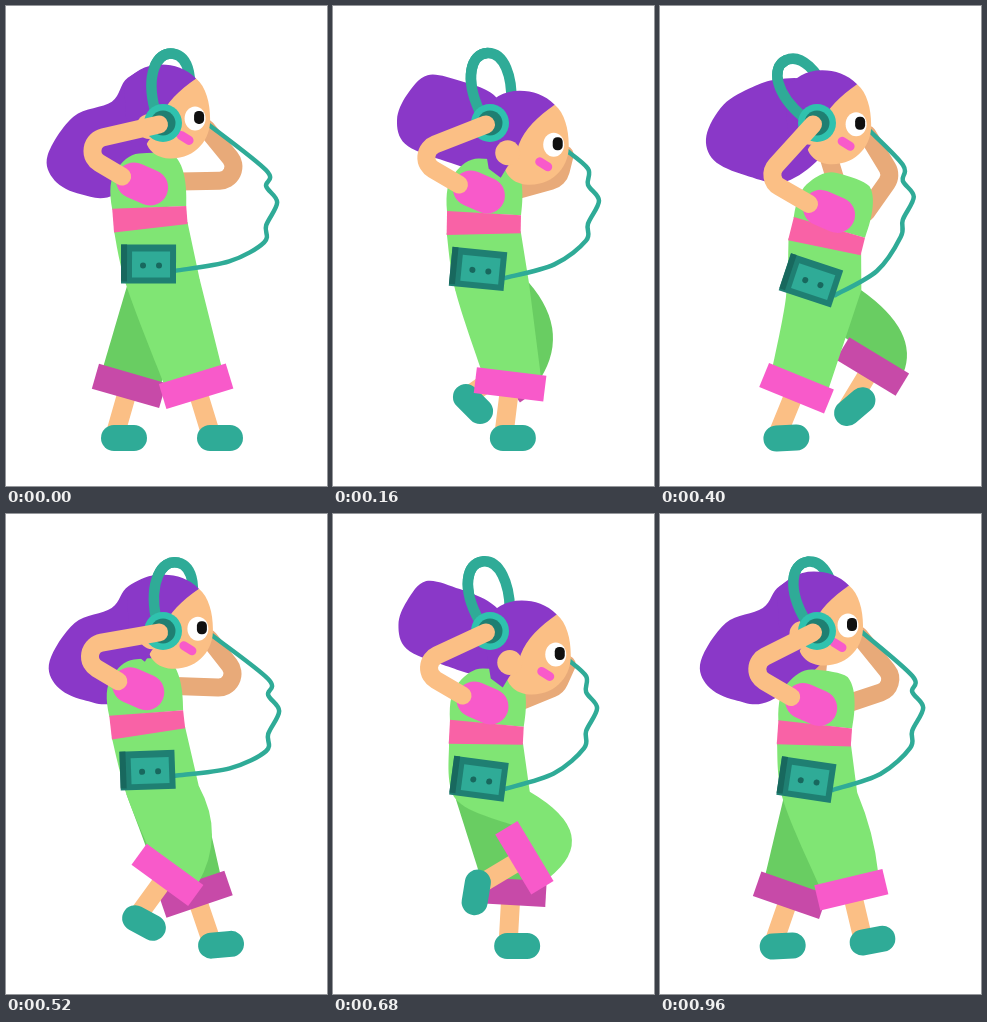
Write an HTML page with a canvas that moves like this. It is 321 px wide and 480 px high and loops after 1 s.

```html
<!DOCTYPE html>
<html lang="en">
<head>
<meta charset="utf-8">
<title>Dancing with headphones</title>
<style>
html, body { margin: 0; height: 100%; overflow: hidden; background: #fff; }
canvas { display: block; }
</style>
</head>
<body>
<canvas id="stage" width="321" height="480"></canvas>
<script>
const ctx = document.getElementById("stage").getContext("2d");
const SKIN = "#fbbf85", SKIN_DARK = "#e8aa79", HAIR = "#8a38c8", TEAL = "#2fab97",
  CUP = "#2fc2ae", TEAL_DARK = "#1f7f72", TEAL_DEEP = "#18685e", GREEN = "#80e574",
  GREEN_DARK = "#69cd62", PINK = "#f85aca", PINK_DARK = "#c74aa8", BELT = "#f962a6";
const FLOOR = 432, FAR_LEG = 460, SHIN = 51;

// Upper body, two beats per loop: time, lean in degrees, nod, hair lift
const BEAT = [
  [20, -6.5, 0.03, 0], [170, 2, 1.03, 1], [280, 18, 0.93, 1.1],
  [340, 21.5, 0.53, 1], [460, 4, -0.1, 0]];
// One leg, one stride per loop: time, foot x, y and angle, shin angle
const STRIDE = [
  [0, 214, FLOOR, 0, -17], [150, 182, FLOOR, 0, 5], [290, 152, FLOOR, 0, 36],
  [460, 118, FLOOR, 0, 16], [520, 138, 409, 28, 36], [620, 140, 398, 45, 55],
  [710, 148, 373, 108, 58], [840, 190, 396, -35, 38], [970, 214, 429, -8, -17]];
const HAIR_LOW = [[155, 63], [122, 72], [105, 94], [68, 109], [43, 147], [50, 172], [77, 186], [112, 187]];
const HAIR_HIGH = [[155, 88], [124, 75], [91, 68], [71, 88], [62, 112], [70, 136], [106, 152], [152, 164]];
const CORD = [[256, 163], [256, 179], [267, 195], [256, 218], [254, 235]];

// Looping cubic interpolation; the first entry of each key is its time
function sample(keys, t, period) {
  const n = keys.length;
  const key = k => keys[(k + n) % n];
  const at = k => key(k)[0] + period * Math.floor(k / n);
  let i = n - 1;
  while (at(i) > t) i--;
  const h = at(i + 1) - at(i), u = (t - at(i)) / h;
  return key(i).slice(1).map((a, c) => {
    const b = key(i + 1)[c + 1];
    const va = (b - key(i - 1)[c + 1]) / (at(i + 1) - at(i - 1)) * h;
    const vb = (key(i + 2)[c + 1] - a) / (at(i + 2) - at(i)) * h;
    return a + u * (va + u * (3 * (b - a) - 2 * va - vb + u * (2 * (a - b) + va + vb)));
  });
}

const rad = deg => deg * Math.PI / 180;
const mix = (a, b, u) => a.map((v, i) => v + (b[i] - v) * u);
const add = (p, dx, dy) => [p[0] + dx, p[1] + dy];

// Point given in the frame of a turned part
function local([x, y, deg], dx, dy) {
  const c = Math.cos(rad(deg)), s = Math.sin(rad(deg));
  return [x + dx * c - dy * s, y + dx * s + dy * c];
}

function place([x, y, deg], draw) {
  ctx.save();
  ctx.translate(x, y);
  ctx.rotate(rad(deg));
  draw();
  ctx.restore();
}

function fill(color, build) {
  ctx.beginPath();
  build();
  ctx.fillStyle = color;
  ctx.fill();
}

function stroke(color, width, build) {
  ctx.beginPath();
  build();
  ctx.strokeStyle = color;
  ctx.lineWidth = width;
  ctx.stroke();
}

const line = (color, width, a, b) =>
  stroke(color, width, () => { ctx.moveTo(...a); ctx.lineTo(...b); });
const disc = (color, x, y, r) => fill(color, () => ctx.arc(x, y, r, 0, 7));
const box = (color, ...r) => fill(color, () => ctx.rect(...r));
const shape = (color, d) => { ctx.fillStyle = color; ctx.fill(new Path2D(d)); };

// Curve through all points, joined to the current path
function curve(pts, closed) {
  const n = pts.length;
  const get = i => closed ? pts[(i + n) % n] : pts[Math.max(0, Math.min(n - 1, i))];
  ctx.lineTo(...pts[0]);
  for (let i = 0; i < n - (closed ? 0 : 1); i++) {
    const [p, a, b, q] = [get(i - 1), get(i), get(i + 1), get(i + 2)];
    ctx.bezierCurveTo(a[0] + (b[0] - p[0]) / 6, a[1] + (b[1] - p[1]) / 6,
      b[0] - (q[0] - a[0]) / 6, b[1] - (q[1] - a[1]) / 6, ...b);
  }
}

function arm(color, shoulder, elbow, hand) {
  stroke(color, 18, () => {
    ctx.moveTo(...shoulder);
    ctx.arcTo(...elbow, ...hand, 14);
    ctx.lineTo(...hand);
  });
}

// The cuff sits on top of the shin; the thigh bulges as the foot lifts
function leg(t, back, front, green, pink) {
  const [x, y, turn, shin] = sample(STRIDE, t, 1000);
  const foot = [x, Math.min(FLOOR, y), turn];
  const ankle = local(foot, -9, -3);
  const cuff = [...local([...ankle, shin], 0, -SHIN), shin];
  const knee = local(cuff, 30, -10), hip = front[0];
  const bulge = 1.2 * (FLOOR - foot[1]);
  line(SKIN, 19, cuff, ankle);
  line(TEAL, 26, local(foot, -10, 0), local(foot, 10, 0));
  fill(green, () => {
    curve([...back, local(cuff, -30, -10)]);
    ctx.lineTo(...knee);
    ctx.quadraticCurveTo(...add(mix(knee, hip, 0.5), bulge, 0), ...hip);
    front.forEach(p => ctx.lineTo(...p));
  });
  place(cuff, () => box(pink, -35, -13, 70, 26));
}

function band(whole) {
  ctx.strokeStyle = TEAL;
  ctx.lineWidth = 10.5;
  ctx.stroke(new Path2D("M-10-12C-24-45-17-70 0-70" + (whole ? "C17-70 24-45 22-20" : "")));
}

function chest() {
  shape(GREEN, "M-37-11C-39-30-37-42-30-50C-24-58-16-65-6-65C8-65 22-64 29-60C37-52 40-34 37-9Z");
  shape(BELT, "M-37-12L37-9V9L-37 12Z");
}

function head() {
  shape(SKIN, "M0-40C10-32 14-15 14 0C15 20 0 41-27 40C-45 39-55 25-50 5L-36-20Z");
  shape(HAIR, "M0-40C-10-50-22-54-35-54C-52-54-62-46-72-36L-70 0L-66 24L-54 33" +
    "Q-48 22-40 12L-36 0C-30-16-17-28 0-40Z");
  disc(SKIN, -47, 8, 12.5);
  fill("#fff", () => ctx.ellipse(-1, 0, 10.5, 12, 0, 0, 7));
  fill("#101010", () => ctx.roundRect(-2, -7.5, 10, 13, 4.5));
  line(PINK, 9, [-15, 17], [-7, 22]);
}

function player() {
  box(TEAL_DARK, -28, -20, 55, 39);
  box(TEAL_DEEP, -28, -20, 6, 37);
  box(TEAL, -17, -13, 38, 26);
  disc(TEAL_DEEP, -6, 1, 3);
  disc(TEAL_DEEP, 10, 1, 3);
}

function draw(t) {
  const [lean, nod, lift] = sample(BEAT, t % 500, 500);
  // Most parts shift in proportion to the lean
  const sway = (x, y, kx, ky) => [x + kx * lean, y + ky * lean];
  const eye = [192 + 30 * nod, 114 + 25 * nod, 0];
  const belt = [...sway(149.5, 216.5, 1.25, 1.08), lean];
  const walkman = [...sway(145, 262.5, 0.45, 0.9), lean + 4.5];
  const cup = [157, 117, -1.9 * lean];
  const sleeve = sway(136, 181, 1.8, 1.5);
  const hipL = sway(122, 283.5, 0.28, 0.6), hipR = sway(195.5, 276, 0.42, 0.6);

  ctx.fillStyle = "#fff";
  ctx.fillRect(0, 0, 321, 480);
  ctx.lineCap = ctx.lineJoin = "round";

  const elbow = add(sway(240, 173, -0.4, -0.25), -14 * nod, 0);
  arm(SKIN_DARK, local(belt, 32, -34), elbow, add(eye, 10, 10));
  line(SKIN_DARK, 18, add(eye, -30, 28), local(belt, -2, -52));
  place(cup, () => band(true));

  const drift = 22 * (nod - 0.9 * lift);
  const tail = HAIR_LOW.map((p, i) => add(mix(p, HAIR_HIGH[i], lift), drift, 0));
  fill(HAIR, () => curve([...tail, [165, 145], [168, 105]], true));

  leg((t + FAR_LEG) % 1000, [hipL], [hipR], GREEN_DARK, PINK_DARK);
  leg(t, [local(belt, -37, 10), hipL], [hipR, local(belt, 37, 7)], GREEN, PINK);
  place(belt, chest);

  const wave = CORD.map(([x, y]) => sway(x, y, -0.95, -0.3));
  const plug = local(walkman, 27, 6);
  stroke(TEAL, 4.5, () =>
    curve([add(eye, 11, 5), ...wave, add(mix(wave[4], plug, 0.5), 9, 5), plug]));

  place(eye, head);
  place(cup, () => band(false));
  disc(CUP, cup[0], cup[1], 19);
  disc(TEAL_DARK, cup[0], cup[1], 12.5);
  line(PINK, 36, sleeve, add(sleeve, 16, 7));
  arm(SKIN, add(sleeve, -12, -4), sway(73, 147, 2.25, 1.8), [153, 118.5]);
  place(walkman, player);
}

function tick(now) {
  draw(Math.floor(now / 40) * 40 % 1000);
  requestAnimationFrame(tick);
}
draw(0);
requestAnimationFrame(tick);
</script>
</body>
</html>
```
